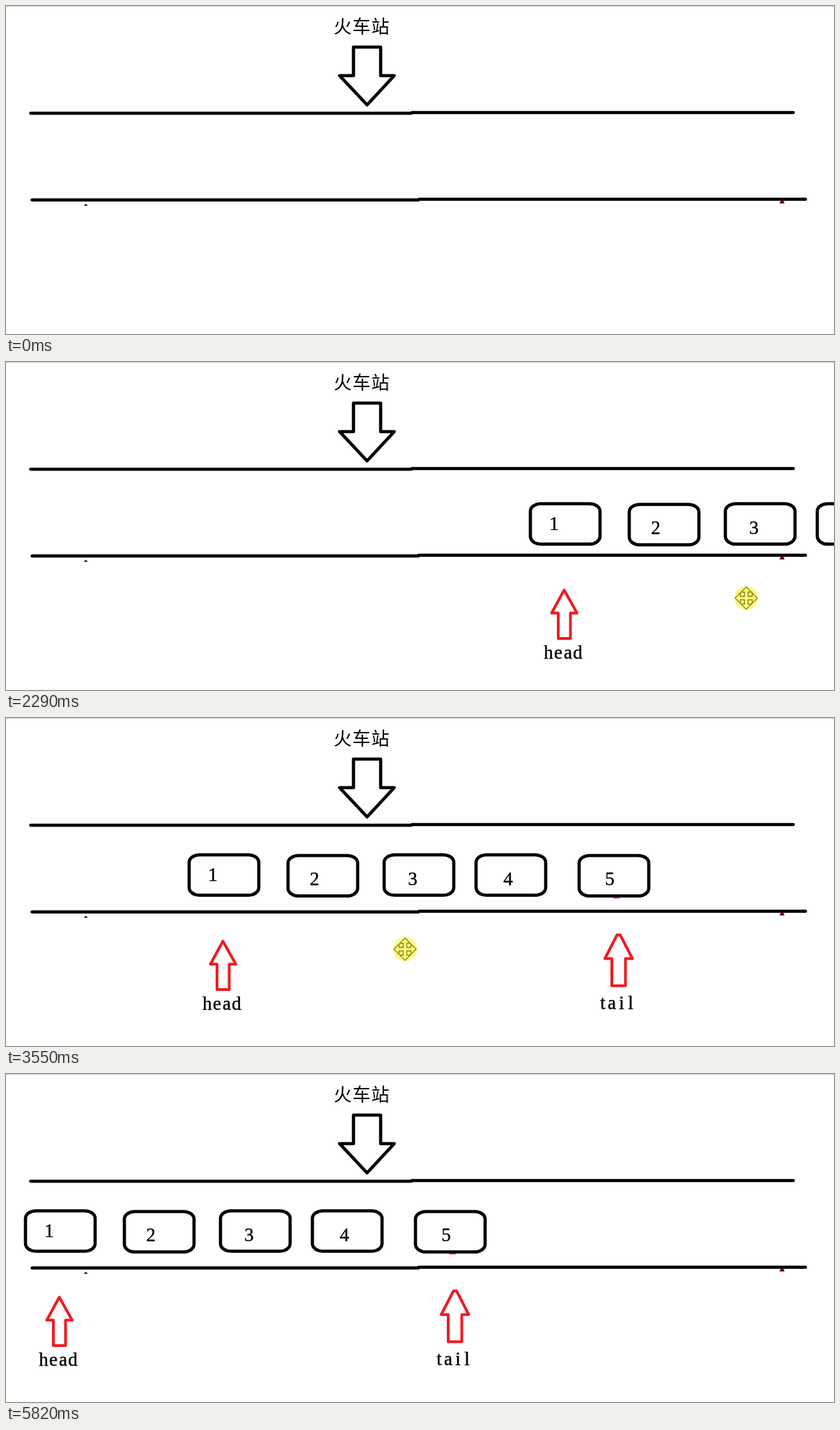
Animation of 1189 by 471 pixels, one loop 8600 ms. Source, as an HTML page:

```html
<!DOCTYPE html>
<html lang="zh">
<head>
<meta charset="utf-8">
<title>Train queue</title>
<style>
html, body { margin: 0; width: 100%; height: 100%; overflow: hidden; background: #fff; }
svg { display: block; width: 1189px; height: 471px; }
.ink { fill: none; stroke: #000; stroke-width: 4.6; stroke-linecap: round; stroke-linejoin: round; }
.red { fill: none; stroke: #ed1c24; stroke-width: 4; stroke-linejoin: round; }
.title { font: 300 26px "Noto Sans CJK SC", "Noto Sans CJK", sans-serif; letter-spacing: 1px; }
.label { font: 27px "Liberation Serif", serif; text-anchor: middle; stroke: #000; stroke-width: .4; }
.move { fill: none; stroke: #858523; stroke-width: 1.3; }
.dash { fill: none; stroke: #0078d7; stroke-dasharray: 4 4; }
.grip { fill: #fff; stroke: #555; }
</style>
</head>
<body>
<svg viewBox="0 0 1189 471">
  <rect width="1189" height="1" fill="#c8c8c8"/>
  <text class="title" x="470.5" y="39">火车站</text>
  <path class="ink" d="M499 59H538V100H557.5L518.5 142L479 100H499Z"/>
  <path class="ink" d="M35.5 154H582M583 153H1130.5M37.5 278.5H592M593 277.5H1148"/>
  <path fill="#600" d="M112 287L113.5 284.5H116L117 287ZM1110.5 283.5L1113 279H1116L1118 283.5Z"/>
  <g id="train">
    <g id="cars"></g>
    <path class="red" d="M76.5 320.5L95 353.5H85.5V390H68V353.5H58.5Z"/>
    <path class="red" d="M642.5 311.5H647L664.5 345.5H654.5V384.5H635V345.5H625Z"/>
    <path stroke="#ed1c24" d="M636.5 258.5H646"/>
    <text class="label" x="54 68 82 96" y="419">head</text>
    <text class="label" x="622 635 649 662" y="418">tail</text>
  </g>
  <g id="frame"><rect class="dash" x="4.5" y="153.5" width="740" height="291"/></g>
  <g id="cursor">
    <circle r="17" fill="#fdf97c"/>
    <path id="arrows" class="move" d="M0-16L7.5-8.5H2.5V-2.5H8.5V-7.5L16 0L8.5 7.5V2.5H2.5V8.5H7.5L0 16L-7.5 8.5H-2.5V2.5H-8.5V7.5L-16 0L-8.5-7.5V-2.5H-2.5V-8.5H-7.5Z"/>
    <path id="cross" class="move" d="M-11 0H11M0-11V11"/>
  </g>
</svg>
<script>
const LOOP = 8600, STEP = 70, ENTER = 1450;
const $ = id => document.getElementById(id);

function add(parent, tag, attrs, text = "") {
  const el = document.createElementNS("http://www.w3.org/2000/svg", tag);
  for (const k in attrs) el.setAttribute(k, attrs[k]);
  el.textContent = text;
  parent.append(el);
}

// left edge, top edge, digit centre, digit baseline
[[28, 196.5, 62, 234], [170, 197.5, 208, 239.5], [308, 196.5, 349, 240],
 [440, 196.5, 486, 240], [588, 197.5, 632, 239.5]].forEach(([x, y, tx, ty], i) => {
  add($("cars"), "rect", { class: "ink", x, y, width: 100, height: 58, rx: 15, ry: 11 });
  add($("cars"), "text", { class: "label", x: tx, y: ty }, i + 1);
});

for (const x of [2, 372, 742])
  for (const y of [151, 297, 442])
    if (x !== 372 || y !== 297)
      add($("frame"), "rect", { class: "grip", x: x - .5, y: y + .5, width: 5, height: 5 });

// time, train offset x, y
const drag = [
  [1450, 1156, 10], [1590, 1084, 11], [1940, 905, -1], [2290, 725, 7],
  [2850, 508, -2], [3200, 387, -4], [3550, 235, 0], [3900, 97, 8],
  [4110, 18, 5], [4530, 2, 1], [4600, 0, 0]
];

function offset(t) {
  const i = drag.findIndex(k => k[0] > t);
  if (i < 0) return [0, 0];
  const a = drag[i - 1], b = drag[i], p = (t - a[0]) / (b[0] - a[0]);
  return [1, 2].map(n => Math.round(a[n] + (b[n] - a[n]) * p));
}

const show = (el, on) => el.style.display = on ? "" : "none";
const place = (el, x, y) => el.setAttribute("transform", `translate(${x} ${y})`);

function draw(t) {
  const inside = t >= ENTER;
  show($("train"), inside);
  show($("cursor"), inside && t < 5490);
  show($("frame"), t >= 4860 && t < 5820);
  if (!inside) return;

  const [dx, dy] = offset(ENTER + Math.floor((t - ENTER) / STEP) * STEP);
  place($("train"), dx, dy);

  let x = 338 + dx, y = 332 + dy;
  if (t >= 5000) {
    const p = Math.min(1, (Math.floor((t - 5000) / STEP) + 1) / 7);
    x = 340 + 676 * p ** 1.25;
    y = 333 + 57 * p * p * (3 - 2 * p);
  }
  place($("cursor"), x, y);
  show($("arrows"), t < 5000 || x < 748);
  show($("cross"), t >= 5000 && x >= 748);
}

const start = performance.now();
function tick() {
  draw((performance.now() - start) % LOOP);
  requestAnimationFrame(tick);
}
tick();
</script>
</body>
</html>
```
